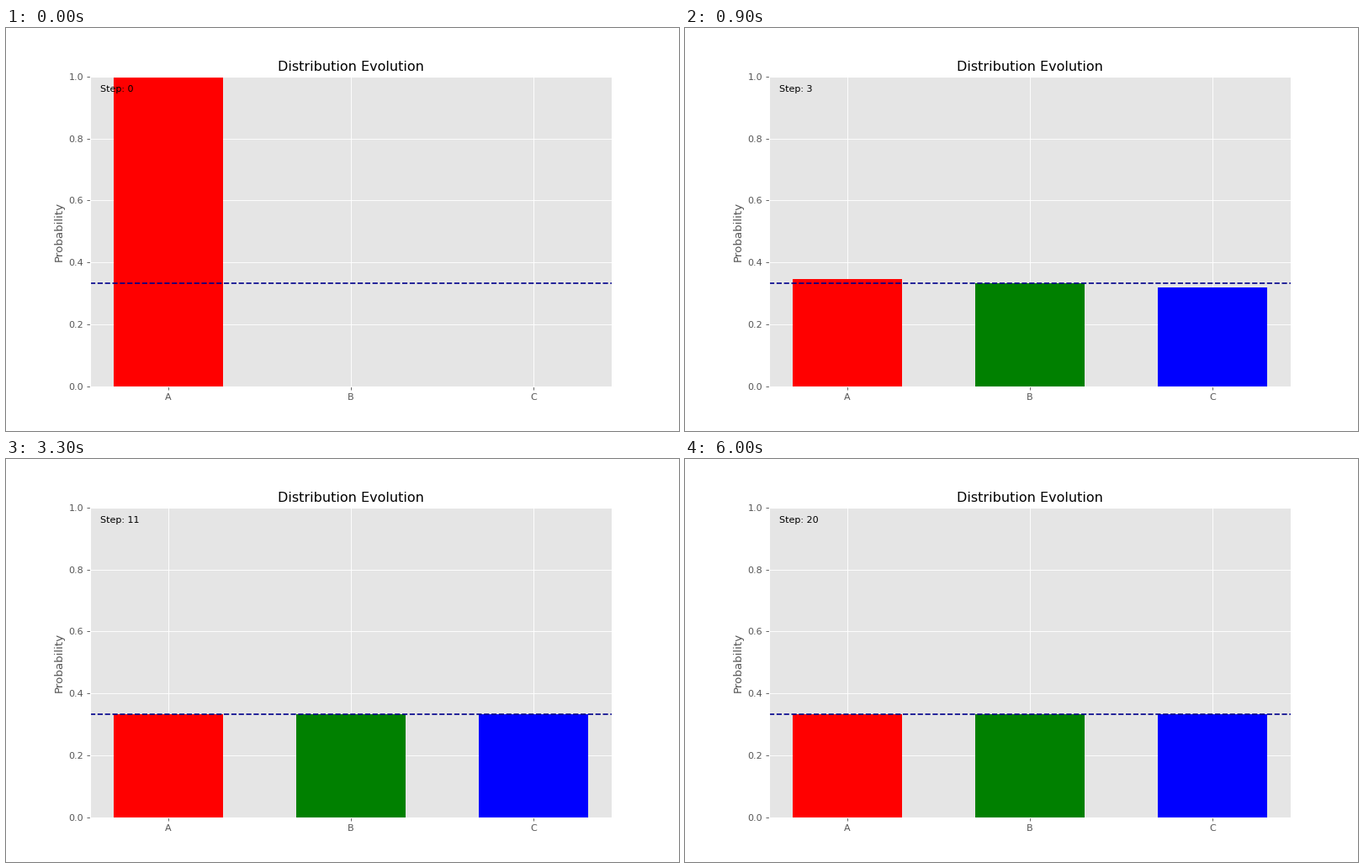
Animation of 800x480 px, one loop 6300 ms. Source, as a matplotlib script:

```python
import numpy as np
import matplotlib.pyplot as plt
from matplotlib.animation import FuncAnimation

plt.style.use("ggplot")

STEPS = 21
STATES = ["A", "B", "C"]
COLORS = ["red", "green", "blue"]
START = np.array([1.0, 0.0, 0.0])
TRANSITION = np.array([
    [0.5, 0.3, 0.2],
    [0.3, 0.4, 0.3],
    [0.2, 0.3, 0.5],
])


def distribution(step):
    return START @ np.linalg.matrix_power(TRANSITION, step)


fig, ax = plt.subplots(figsize=(10, 6), dpi=80)
bars = ax.bar(STATES, START, width=0.6, color=COLORS)
ax.axhline(1 / 3, color="darkblue", linestyle="--", linewidth=1.5)
ax.set_ylim(0, 1)
ax.set_ylabel("Probability")
ax.set_title("Distribution Evolution")
label = ax.text(0.02, 0.95, "", transform=ax.transAxes)


def update(step):
    for bar, p in zip(bars, distribution(step)):
        bar.set_height(p)
    label.set_text(f"Step: {step}")
    return [*bars, label]


anim = FuncAnimation(fig, update, frames=STEPS, interval=300,
                     repeat=True, repeat_delay=0)
plt.show()
```
